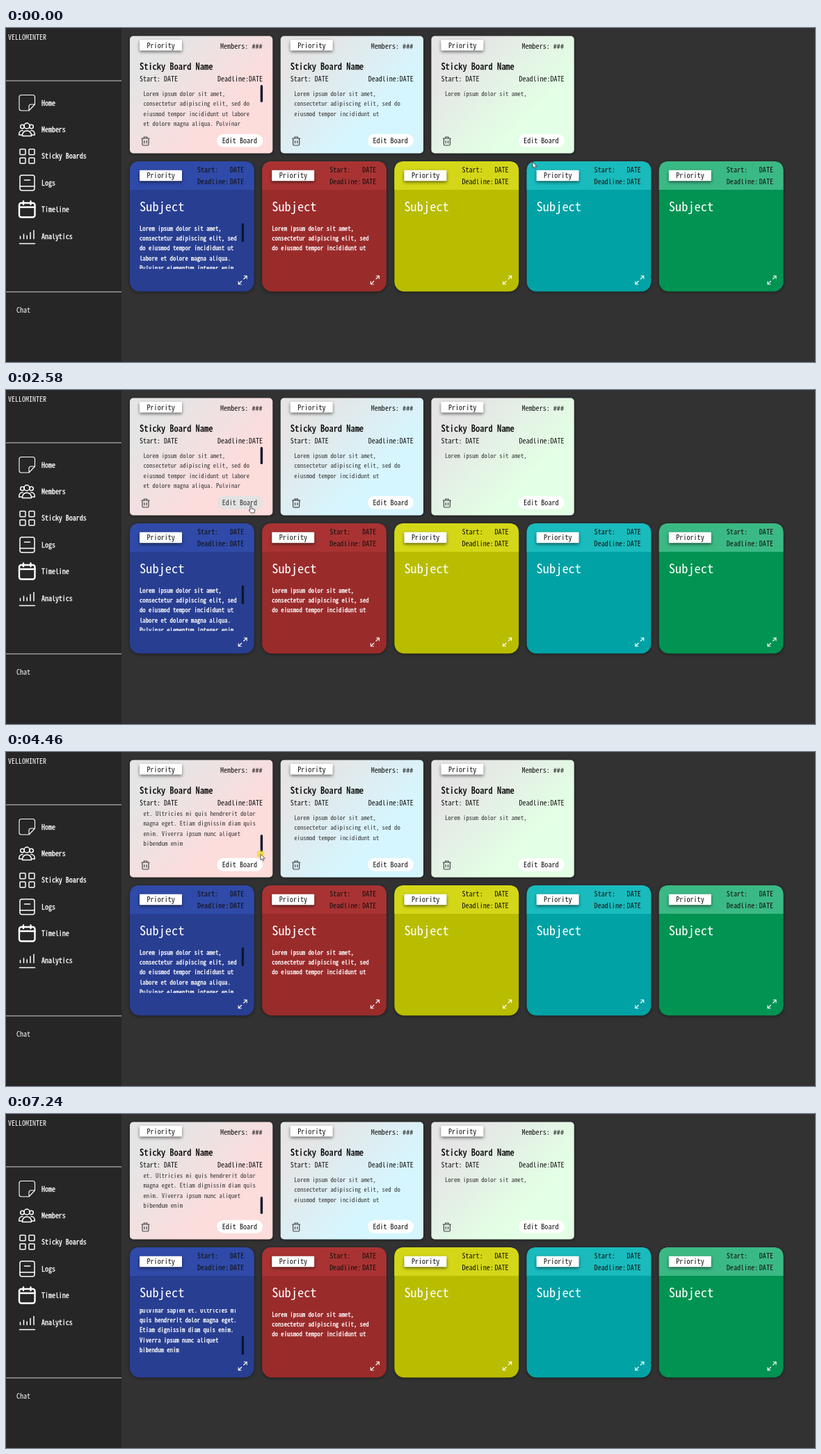
Recreate the animation shown at these times as an HTML page. Size 1163x481 px, loop 7510 ms.

```html
<!DOCTYPE html>
<html lang="en">
<head>
<meta charset="utf-8">
<title>Sticky boards</title>
<style>
html, body { margin: 0; width: 100%; height: 100%; overflow: hidden; background: #323232; }
svg { display: block; width: 100%; height: 100%; }
text { font-family: 'Noto Sans Mono CJK JP', 'Noto Sans Mono', 'DejaVu Sans Mono', monospace; letter-spacing: var(--gap, 0); }
.bold { stroke: currentColor; stroke-width: .3; }
.badge { fill: #fff; filter: drop-shadow(0 2px 2px #0008); }
.card { filter: drop-shadow(0 1px 2px #0007); }
.line { fill: none; stroke: #fff; stroke-width: 1.5; stroke-linejoin: round; stroke-linecap: round; }
</style>
</head>
<body>
<svg id="stage" viewBox="0 0 1163 481"></svg>
<script>
const LOOP = 7510, LINE = 14.25, MAX_SCROLL = 91.5;
const $ = id => document.getElementById(id);
const clamp = (v, lo = 0, hi = 1) => Math.min(hi, Math.max(lo, v));
const mix = (a, b, k) => a + (b - a) * k;

// Keep the narrow half-em advance whichever monospace face is found
const pen = document.createElement('canvas').getContext('2d');
pen.font = "100px 'Noto Sans Mono CJK JP', 'Noto Sans Mono', 'DejaVu Sans Mono', monospace";
$('stage').style.setProperty('--gap', (.5 - pen.measureText('0').width / 100).toFixed(3) + 'em');

const text = (x, mid, str, size = 10.1, color = '#111', extra = '') =>
  `<text x="${x}" y="${mid + size * .36}" font-size="${size}" fill="${color}" color="${color}" ${extra}>${str}</text>`;
const bold = 'class="bold"';
const rect = (x, y, w, h, r, attrs) => `<rect x="${x}" y="${y}" width="${w}" height="${h}" rx="${r}" ${attrs}/>`;
const lines = (x, mid, list, color, extra) =>
  list.map((s, i) => text(x, mid + i * LINE, s, 8.72, color, extra)).join('');

const boardText = ['Lorem ipsum dolor sit amet,', 'consectetur adipiscing elit, sed do',
  'eiusmod tempor incididunt ut labore', 'et dolore magna aliqua. Pulvinar',
  'elementum integer enim neque volutpat', 'ac tincidunt vitae pulvinar sapien',
  'et. Ultricies mi quis hendrerit dolor', 'magna eget. Etiam dignissim diam quis',
  'enim. Viverra ipsum nunc aliquet', 'bibendum enim'];
const noteText = ['Lorem ipsum dolor sit amet,', 'consectetur adipiscing elit, sed',
  'do eiusmod tempor incididunt ut', 'labore et dolore magna aliqua.',
  'Pulvinar elementum integer enim', 'neque volutpat ac tincidunt vitae',
  'pulvinar sapien et. Ultricies mi', 'quis hendrerit dolor magna eget.',
  'Etiam dignissim diam quis enim.', 'Viverra ipsum nunc aliquet', 'bibendum enim'];

const icons = [
  '<path stroke-width="1.1" d="M22 96.5H38.5Q41.5 96.5 41.5 99.5V110L33 119H22Q19 119 19 116V99.5Q19 96.5 22 96.5ZM41.5 110H36Q33 110 33 113V119"/>',
  '<circle cx="30" cy="141" r="4"/><circle cx="23.5" cy="142" r="2.8"/><circle cx="36.5" cy="142" r="2.8"/>' +
  '<path d="M23.5 155.5Q23.5 148 30 148T36.5 155.5ZM23 154H18.7Q18.5 147.5 24 147.5M37 154H41.3Q41.5 147.5 36 147.5"/>',
  [[20, 174.5], [33, 174.5], [20, 187], [33, 187]].map(([x, y]) => rect(x, y, 8, 8, 1, '')).join(''),
  rect(20, 212, 21, 22, 3, '') + '<path d="M20 228H41M26.5 219H34.5"/>',
  '<g stroke-width="2.4">' + rect(19, 252, 22.5, 20.5, 3, '') + '<path d="M19 258H41.5M25 249.5V254M35.5 249.5V254"/></g>',
  '<path d="M19.5 310.5H41.5M20.5 300V303.5M25.5 297V303.5M30.2 299V303.5M35 294.5V303.5M40 291.5V303.5"/>'
];
const menu = ['Home', 'Members', 'Sticky Boards', 'Logs', 'Timeline', 'Analytics'];

const sidebar = () => rect(0, 0, 166, 481, 0, 'fill="#262626"') +
  '<path d="M0 76H166M0 380H166" stroke="#d0d0d0"/>' +
  text(3, 13, 'VELLOMINTER', 10, '#fff') + text(15, 406, 'Chat', 10, '#fff') +
  `<g class="line">${icons.join('')}</g>` +
  menu.map((s, i) => text(51, 108 + i * 38.4, s, 9.95, '#fff', bold)).join('');

const badge = y => rect(14, y, 61, 15.5, 1, 'class="badge"') + text(24.5, y + 8, 'Priority');

const board = (color, i) => `
<linearGradient id="fade${i}" gradientUnits="userSpaceOnUse" x1="9" y1="2" x2="196" y2="190">
  <stop stop-color="#e5e5e5"/><stop offset=".18" stop-color="#e5e5e5"/><stop offset=".68" stop-color="${color}"/></linearGradient>
<g transform="translate(${178 + i * 216.7} 0)">
  ${rect(0, 11.5, 205.3, 169, 5, `fill="url(#fade${i})" class="card"`)}
  ${badge(17)}
  ${text(130, 26, 'Members: ###')}
  ${text(14, 55.5, 'Sticky Board Name', 12.4, '#000', bold)}
  ${text(14, 73.5, 'Start: DATE', 10)}${text(126, 73.5, 'Deadline:DATE', 10)}
  ${i ? lines(19.5, 95, i == 1 ? [boardText[0], boardText[1], 'eiusmod tempor incididunt ut'] : [boardText[0]], '#333') :
    `<g clip-path="url(#boardView)"><g id="boardScroll">${lines(19.5, 95, boardText, '#333')}</g></g>` +
    rect(187.7, 82, 3.4, 25, 1.7, 'id="boardThumb" fill="#0b182a"')}
  <g id="trash${i}" data-at="22.5 163" transform="translate(22.5 163)" fill="none" stroke="#454545" stroke-width="1.2">
    <path d="M-6-4H6M-2.2-4.2V-6H2.2V-4.2M-4.5-4V4.5Q-4.5 6 -3 6H3Q4.5 6 4.5 4.5V-4M-1.6-1V3.2M1.6-1V3.2"/></g>
  <g id="pill${i}">${rect(125.4, 152.8, 65.8, 18.8, 9.4, 'fill="#fff"')}${text(132.7, 162.5, 'Edit Board')}</g>
</g>`;

const note = ([head, body], i) => `
<g transform="translate(${178 + i * 190.2} 0)">
  <g class="card">${rect(0, 192, 178.7, 187.5, 14, `fill="${body}"`)}
  <path fill="${head}" d="M0 233V206Q0 192 14 192H164.7Q178.7 192 178.7 206V233Z"/></g>
  ${badge(204.7)}
  ${text(97, 204.5, 'Start:')}${text(144, 204.5, 'DATE')}
  ${text(97, 221.5, 'Deadline:')}${text(144, 221.5, 'DATE')}
  ${text(14, 257.5, 'Subject', 18.4, '#fff')}
  ${i == 0 ? `<g clip-path="url(#noteView)"><g id="noteScroll">${lines(14, 288.7, noteText, '#fff', bold)}</g></g>` +
    rect(160.7, 281, 3.4, 27.5, 1.7, 'id="noteThumb" fill="#0c1730"') : ''}
  ${i == 1 ? lines(14, 288.7, noteText.slice(0, 3), '#fff', bold) : ''}
  <g id="grow${i}" data-at="162.2 363" transform="translate(162.2 363)" class="line" style="stroke-width:1.1">
    <path d="M1.5-1.5L6-6M2-6H6V-2M-1.5 1.5L-6 6M-2 6H-6V2"/></g>
</g>`;

$('stage').innerHTML = `
<clipPath id="boardView"><rect x="10" y="82" width="176" height="62"/></clipPath>
<clipPath id="noteView"><rect x="10" y="281" width="149" height="66"/></clipPath>
${sidebar()}
${['#fddcdc', '#d6f6ff', '#e3ffe5'].map(board).join('')}
${[['#2f4aa8', '#283e91'], ['#a93333', '#9a2b2b'], ['#d4d717', '#b9bd00'], ['#19bbbd', '#00a2a5'], ['#3bb984', '#009352']].map(note).join('')}
<g id="cursor">
  <circle id="press" r="5.5" fill="#e8dc00" opacity=".75"/>
  <path id="arrow" d="M0 0V8.6L2 6.8L3.4 9.8L4.8 9.1L3.5 6.2H6.2Z" fill="#fff" stroke="#222" stroke-width=".7"/>
  <path id="hand" d="M-1 .3Q0-.8 1 .3V3.8L5 4.8Q6 5.2 5.8 6.5L5 10H.2L-2.8 6.4Q-2.6 5-1 6Z" fill="#fff" stroke="#222" stroke-width=".8"/>
</g>`;

// Cursor stops: time, x, y
const path = [[70, 757, 193], [330, 765, 166], [470, 766, 162], [620, 720, 150], [810, 665, 158],
  [950, 634, 161], [1150, 633, 162], [1420, 563, 165], [1560, 557, 165], [1690, 557, 165],
  [2200, 420, 163], [2400, 417, 163], [2580, 352, 167], [2780, 335, 165], [2960, 202, 163],
  [3060, 201, 163], [3250, 367, 98], [3650, 367, 97], [4400, 366, 147], [4460, 366, 147],
  [4720, 340, 165], [5130, 340, 288], [5260, 340, 289], [5740, 340, 335], [5950, 339, 367],
  [6150, 339, 367], [6450, 530, 364], [6720, 531, 364], [6900, 722, 364], [6980, 735, 364],
  [7100, 908, 364], [7170, 1020, 410], [7235, 1092, 492]];

// Element, pointer enters, pointer leaves
const hovers = [['pill2', 270, 590], ['trash2', 920, 1190], ['pill1', 1410, 1850], ['trash1', 2130, 2460],
  ['pill0', 2560, 2850], ['trash0', 2930, 3090], ['pill0', 4560, 4780],
  ['grow0', 5840, 6200], ['grow1', 6390, 6750], ['grow2', 6860, 6970], ['grow3', 7070, 7120]];

function cursorAt(t) {
  const i = path.findIndex(p => p[0] > t);
  if (i < 1) return (i ? path.at(-1) : path[0]).slice(1);
  const [a, b] = [path[i - 1], path[i]];
  const u = (t - a[0]) / (b[0] - a[0]), k = u * u * (3 - 2 * u);
  return [mix(a[1], b[1], k), mix(a[2], b[2], k)];
}

function scroll(name, moved, travel) {
  const d = clamp(moved, 0, travel);
  $(name + 'Thumb').setAttribute('transform', `translate(0 ${d})`);
  $(name + 'Scroll').setAttribute('transform', `translate(0 ${-d / travel * MAX_SCROLL})`);
}

function hover(id, k) {
  const el = $(id);
  if (!id.startsWith('pill')) {
    el.setAttribute('transform', `translate(${el.dataset.at}) scale(${1 + .16 * k})`);
    return;
  }
  const grey = (a, b) => `rgb(${[0, 0, 0].fill(Math.round(mix(a, b, k)))})`;
  el.children[0].setAttribute('fill', grey(255, 84));
  el.children[1].setAttribute('fill', grey(17, 255));
}

function draw(now) {
  const t = now % LOOP, [x, y] = cursorAt(t);
  const levels = {};
  let over = false;
  for (const [id, start, end] of hovers) {
    levels[id] = (levels[id] || 0) + clamp((t - start) / 130) - clamp((t - end) / 130);
    over ||= t >= start && t < end;
  }
  for (const id in levels) hover(id, clamp(levels[id]));
  scroll('board', t < 3650 ? 0 : cursorAt(Math.min(t, 4400))[1] - 97, 37);
  scroll('note', t < 5260 ? 0 : cursorAt(Math.min(t, 5740))[1] - 289, 38.5);
  $('cursor').setAttribute('transform', `translate(${x} ${y})`);
  $('hand').style.display = over ? '' : 'none';
  $('arrow').style.display = over ? 'none' : '';
  const pressed = t >= 3640 && t < 4520 || t >= 5260 && t < 5760;
  $('press').style.display = pressed ? '' : 'none';
  $('press').setAttribute('opacity', t > 4400 && t < 4520 ? .6 : .8);
}

const begin = performance.now();
function tick() {
  draw(performance.now() - begin);
  requestAnimationFrame(tick);
}
tick();
</script>
</body>
</html>
```
